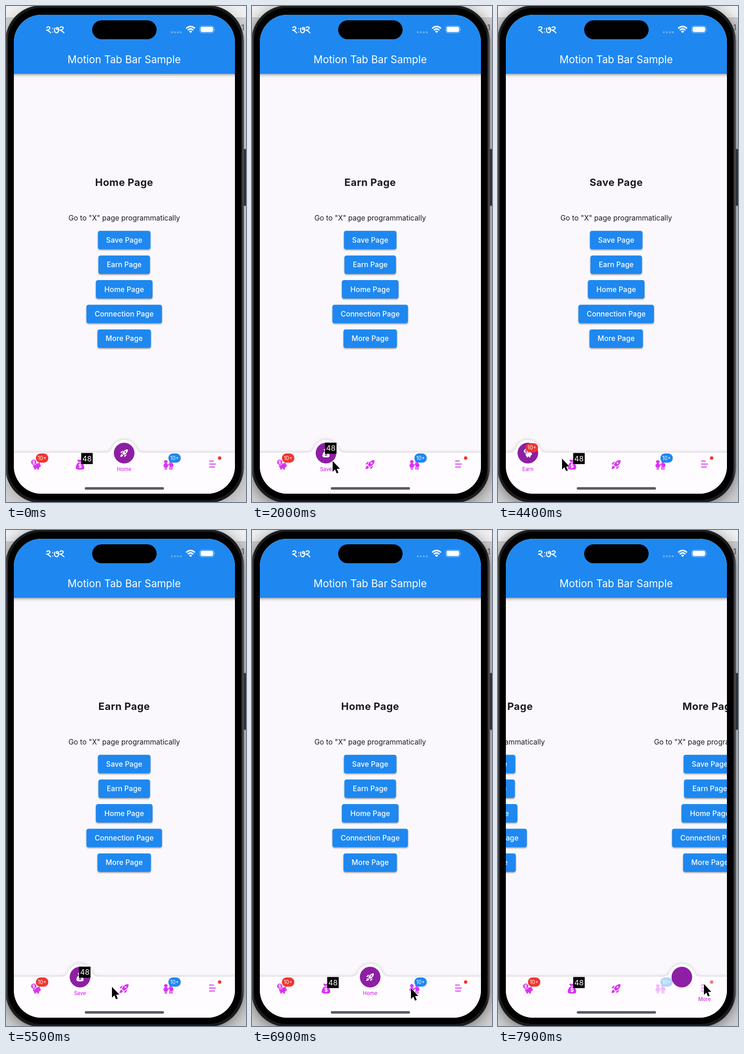
An HTML page that plays this animation: 521x1075 px, repeating every 8000 ms.

```html
<!DOCTYPE html>
<html lang="en">
<head>
<meta charset="utf-8">
<title>Motion Tab Bar Sample</title>
<style>
  html, body { margin: 0; width: 100%; height: 100%; overflow: hidden; background: #d2d2d4; }
  svg { display: block; width: 521px; height: 1075px; font-family: Inter, sans-serif; }
  text { text-anchor: middle; }
  .bar { font-size: 22.3px; letter-spacing: .08px; fill: #fff; }
  .head { font-size: 22px; font-weight: 700; letter-spacing: .45px; fill: #1d1b20; }
  .body { font-size: 15.55px; fill: #1d1b20; }
  .btn rect { fill: #1e88f0; filter: drop-shadow(0 2px 1.6px rgba(0,0,0,.36)); }
  .btn text { font-size: 15.5px; font-weight: 500; letter-spacing: .08px; fill: #fff; }
  .label { font-size: 11.1px; font-weight: 500; fill: #d432f0; }
  .icon { fill: currentColor; color: #d834f2; --gap: #fffcff; }
  .fab .icon { color: #fff; --gap: #8e1ea4; }
  .gap { fill: var(--gap); }
  .cash { font-weight: 700; fill: var(--gap); }
  .line { fill: none; stroke: currentColor; stroke-linecap: round; }
  .pill { font-size: 11.2px; fill: #fff; }
  .count { font-size: 16.3px; fill: #fff; }
  .digits { fill: none; stroke: #fff; stroke-width: 2.2; stroke-linecap: round; stroke-linejoin: round; }
</style>
</head>
<body>
<svg viewBox="0 0 521 1075">
  <defs>
    <clipPath id="screen"><rect x="17" y="19" width="480" height="1038" rx="60"/></clipPath>
    <linearGradient id="rim">
      <stop offset="0" stop-color="#55555a"/><stop offset=".012" stop-color="#1b1b1d"/>
      <stop offset=".988" stop-color="#1b1b1d"/><stop offset="1" stop-color="#55555a"/>
    </linearGradient>
    <g id="pig">
      <ellipse cx="1.4" cy="3" rx="7.6" ry="5.8"/>
      <path d="M-4 6H0V11H-3ZM3 6H7L6.5 11H3ZM4-2L8.5-5V-1L10.5 1.5V5H7Z"/>
      <circle class="gap" cx="-4.6" cy="-5" r="6.8"/>
      <circle cx="-4.6" cy="-5" r="5.7"/>
      <text class="cash" x="-4.6" y="-1.6" font-size="9.5">$</text>
    </g>
    <g id="bag">
      <path d="M-3.5-4.5L-6-10Q-3-11 0-9.5Q3-11 6-10L3.5-4.5C8-1 10 5 9 8Q8 11 4 11H-4Q-8 11-9 8C-10 5-8-1-3.5-4.5Z"/>
      <rect class="gap" x="-4.5" y="-5.4" width="9" height="1.3"/>
      <text class="cash" y="7.5" font-size="11.5">$</text>
    </g>
    <g id="rocket" transform="translate(-12 -12)">
      <path fill-rule="evenodd" d="M11.2 17S15 15.4 17.1 13.3C22.5 7.9 21.6 3.7 21.3 2.7C20.3 2.4 16.1 1.5 10.7 6.9C8.6 9.1 7 12.8 7 12.8ZM13 9a2 2 0 1 1 4 0a2 2 0 1 1-4 0Z"/>
      <path d="M9.2 6.3Q7 9 5.6 12.2L2 10.7L6 6.6Q6.8 5.9 7.9 6.1ZM17.7 14.8Q15 17 11.8 18.4L13.3 22L17.4 18Q18.1 17.2 17.9 16.1ZM9 18Q9 19.4 8.1 20.1C6.9 21.3 2 22 2 22S2.7 17.1 3.9 15.9A3 3 0 0 1 9 18Z"/>
    </g>
    <g id="kids">
      <circle cx="-5.4" cy="-6.2" r="3.3"/>
      <path d="M-9.6-4.2L-8.4-8.6H-2.4L-1.2-4.2H-3L-5.4-2.4L-7.8-4.2Z"/>
      <path d="M-7.4-3H-3.4L-.8 6H-3V11.3H-5V6H-5.8V11.3H-7.8V6H-10Z"/>
      <circle cx="5.6" cy="-6.4" r="3.4"/>
      <path d="M2.6-3H8.6Q10-3 10.4-1.5L11.4 4.2H9V11.3H6.4V5H5V11.3H2.4Z"/>
      <path class="line" stroke-width="2" d="M-4-2L-.6 2.2L3-2M-7-2L-10.2 2.6"/>
    </g>
    <path id="menu" class="line" stroke-width="2" d="M-6.5-7.5H2M-6.5-1H6.5M-6.5 5.5H4.5"/>
  </defs>

  <rect width="521" height="1075" fill="#d2d2d4"/>
  <rect width="521" height="25" fill="#f0eff1"/>
  <path d="M0 25.5H521" stroke="#b4b4b6"/>
  <text x="514" y="53" font-size="17" fill="#4a4a4c">1</text>
  <rect id="shade" y="6" width="515" height="1075" rx="77" style="filter:blur(16px)"/>
  <rect x="514" y="310" width="9" height="123" rx="2" fill="#303033" stroke="#6c6c70"/>
  <rect x="-1" y="-1" width="517" height="1078" rx="77" fill="url(#rim)" stroke="#48484b"/>
  <rect x="4" y="4" width="507" height="1067" rx="73"/>

  <g clip-path="url(#screen)">
    <rect x="17" y="19" width="480" height="1038" fill="#faf8fc"/>
    <g id="pages"></g>
    <rect x="10" y="10" width="494" height="137" fill="#1e88f0" style="filter:drop-shadow(0 2px 3px rgba(0,0,0,.4))"/>
    <text class="bar" x="256.6" y="124">Motion Tab Bar Sample</text>

    <g class="digits">
      <path id="two" d="M88.5 47C91 43.8 96 45 95.3 48.5C94.6 51 91.500 52 88 52.400Q92.500 53 97 58.200"/>
      <use href="#two" x="28.8"/>
      <path d="M101.5 49.2V49.3M101.5 56.5V56.6"/>
      <path d="M106 47.500C104.500 53.500 106 58 109.500 58C114 58 115.200 51.500 113.800 48.200C112.400 45.200 109 46.200 109.600 49.500C110 51.500 112 51.300 112.200 50"/>
    </g>
    <rect x="187" y="31" width="140" height="41" rx="20.5"/>
    <g fill="#66aef5">
      <circle cx="360" cy="57" r="2.2"/><circle cx="366.5" cy="57" r="2.2"/>
      <circle cx="373" cy="57" r="2.2"/><circle cx="379.5" cy="57" r="2.2"/>
    </g>
    <g fill="none" stroke="#fff" stroke-width="3">
      <path d="M391.2 48.6Q400.7 40.2 410.2 48.6M394.6 52.3Q400.7 47 406.8 52.3"/>
      <path d="M400.7 58.6L397.2 55Q400.7 52.2 404.2 55Z" fill="#fff" stroke="none"/>
    </g>
    <rect x="420.7" y="43.3" width="30.5" height="15" rx="4.8" fill="none" stroke="#fff" stroke-opacity=".5" stroke-width="1.1"/>
    <rect x="422.5" y="45" width="27" height="11.5" rx="3.4" fill="#fff"/>
    <path d="M452.7 48.5Q454.8 50.8 452.7 53Z" fill="#fff" opacity=".6"/>

    <g fill="#fffcff" style="filter:drop-shadow(0 -1px 3px rgba(0,0,0,.17))">
      <path id="bump" d="M-42 0C-32 0-29-4-26.5-10A28.7 28.7 0 0 1 26.5-10C29-4 32 0 42 0V20H-42Z"/>
      <rect x="5" y="968" width="504" height="100"/>
    </g>
    <g id="tabs"></g>
    <g id="fab" class="fab"><circle r="22.4" fill="#8e1ea4"/></g>
    <rect x="171" y="1042.7" width="172" height="5.5" rx="2.75" fill="#5d5961"/>
  </g>
  <path id="cursor" d="M0 0V23.5L5.3 18.5L8.8 27L12.6 25.4L9 17H16Z" stroke="#fff" stroke-width="1.7" stroke-linejoin="round" paint-order="stroke"/>
</svg>

<script>
const LOOP = 8000, ANIM = 300, PAGE = 479.2, MID = 256.6;
const $ = id => document.getElementById(id);
const tabX = i => 64.8 + 95.85 * i;

const names = ['Save', 'Earn', 'Home', 'Connection', 'More'];
const widths = [114, 112, 123, 164, 116];
const tabs = [
  { label: 'Earn', icon: 'pig', badge: '10+', color: '#f2352f' },
  { label: 'Save', icon: 'bag', badge: '48' },
  { label: 'Home', icon: 'rocket' },
  { label: 'Connection', icon: 'kids', badge: '10+', color: '#1e88f0' },
  { label: 'More', icon: 'menu', dot: true }
];

const buttons = names.map((name, i) => {
  const y = 487.2 + 53.45 * i;
  return `<g class="btn"><rect x="${MID - widths[i] / 2}" y="${y}" width="${widths[i]}" height="40" rx="4.5"/>
    <text x="${MID}" y="${y + 25.4}">${name} Page</text></g>`;
}).join('');

$('pages').innerHTML = names.map((name, i) => `<g transform="translate(${PAGE * i})">
  <text class="head" x="${MID}" y="389.7">${name} Page</text>
  <text class="body" x="${MID}" y="465.3">Go to "X" page programmatically</text>${buttons}</g>`).join('');

function badge(tab, x, y) {
  if (tab.dot) return `<circle cx="${x + 2}" cy="${y}" r="3.7" fill="#f2352f"/>`;
  if (!tab.badge) return '';
  if (tab.color) return `<rect x="${x - 13.5}" y="${y - 10}" width="27" height="20" rx="9.8" fill="${tab.color}"/>
    <text class="pill" x="${x}" y="${y + 4}">${tab.badge}</text>`;
  return `<rect x="${x - 11}" y="${y - 11}" width="25" height="24"/>
    <text class="count" x="${x + 1.5}" y="${y + 7}">${tab.badge}</text>`;
}

const use = (tab, scale) => `<g class="icon" transform="scale(${scale})"><use href="#${tab.icon}"/></g>`;

$('tabs').innerHTML = tabs.map((tab, i) => `<g transform="translate(${tabX(i)} 993.7)">
  <g class="item">${use(tab, 1)}${badge(tab, 13.6, -13.9)}</g>
  <text class="label">${tab.label}</text></g>`).join('');
$('fab').innerHTML += tabs.map(tab => `<g class="mark">${use(tab, .84)}${badge(tab, 8.8, -11.6)}</g>`).join('');

const items = document.querySelectorAll('.item');
const labels = document.querySelectorAll('.label');
const marks = document.querySelectorAll('.mark');

// time and chosen tab
const taps = [[-ANIM, 2], [1440, 1], [3134.6, 0], [4670, 1], [5790, 2], [7255, 3], [7801, 4]];
// time, x, y
const trail = [
  [720, 183, 962], [900, 175, 986], [2200, 175, 986], [2850, 63, 989], [3750, 63, 989],
  [4400, 139, 981], [4600, 160, 987], [5100, 160, 987], [5500, 230, 990], [5720, 256, 990],
  [6250, 256, 990], [6900, 345, 993], [7100, 352, 991], [7350, 352, 991], [7720, 447, 984]
];

const clamp = v => Math.max(0, Math.min(1, v));
const mix = (a, b, k) => a + (b - a) * k;

function bezier(x1, y1, x2, y2) {
  const at = (a, b, u) => 3 * a * u * (1 - u) ** 2 + 3 * b * u * u * (1 - u) + u ** 3;
  return x => {
    if (x <= 0 || x >= 1) return clamp(x);
    let lo = 0, hi = 1;
    for (let n = 0; n < 24; n++) {
      const u = (lo + hi) / 2;
      if (at(x1, x2, u) < x) lo = u; else hi = u;
    }
    return at(y1, y2, lo);
  };
}
const ease = bezier(.25, .1, .25, 1), easeOut = bezier(0, 0, .58, 1);

function moveCursor(t) {
  const last = trail.length - 1;
  let n = trail.findIndex(p => p[0] > t);
  if (n < 0) n = last;
  const a = trail[Math.max(0, n - 1)], b = trail[n];
  let k = clamp((t - a[0]) / (b[0] - a[0] || 1));
  k = k * k * (3 - 2 * k);
  $('cursor').setAttribute('transform', `translate(${mix(a[1], b[1], k)} ${mix(a[2], b[2], k)})`);
  $('cursor').style.visibility = t < trail[0][0] ? 'hidden' : 'visible';
}

function draw(t) {
  let n = taps.length - 1;
  while (taps[n][0] > t) n--;
  const [start, to] = taps[n];
  const from = n ? taps[n - 1][1] : to;
  const p = clamp((t - start) / ANIM);
  const x = tabX(mix(from, to, easeOut(p)));

  $('pages').setAttribute('transform', `translate(${-PAGE * mix(from, to, ease(p))})`);
  $('bump').setAttribute('transform', `translate(${x} 968)`);
  $('fab').setAttribute('transform', `translate(${x} 969)`);

  const leaving = p < .2;
  const shown = leaving ? from : to;
  const alpha = leaving ? 1 - easeOut(p / .2) : easeOut((p - .8) / .2);
  tabs.forEach((tab, i) => {
    items[i].style.opacity = i === to ? 1 - p : i === from ? p : 1;
    labels[i].style.visibility = i === to ? 'visible' : 'hidden';
    labels[i].setAttribute('y', mix(33.3, 14.3, p));
    marks[i].style.opacity = i === shown ? alpha : 0;
  });

  // the window gains focus and a deeper shadow
  $('shade').setAttribute('opacity', t < 1100 ? .22 : .5);
  moveCursor(t);
}

function tick() {
  draw(performance.now() % LOOP);
  requestAnimationFrame(tick);
}
tick();
</script>
</body>
</html>
```
